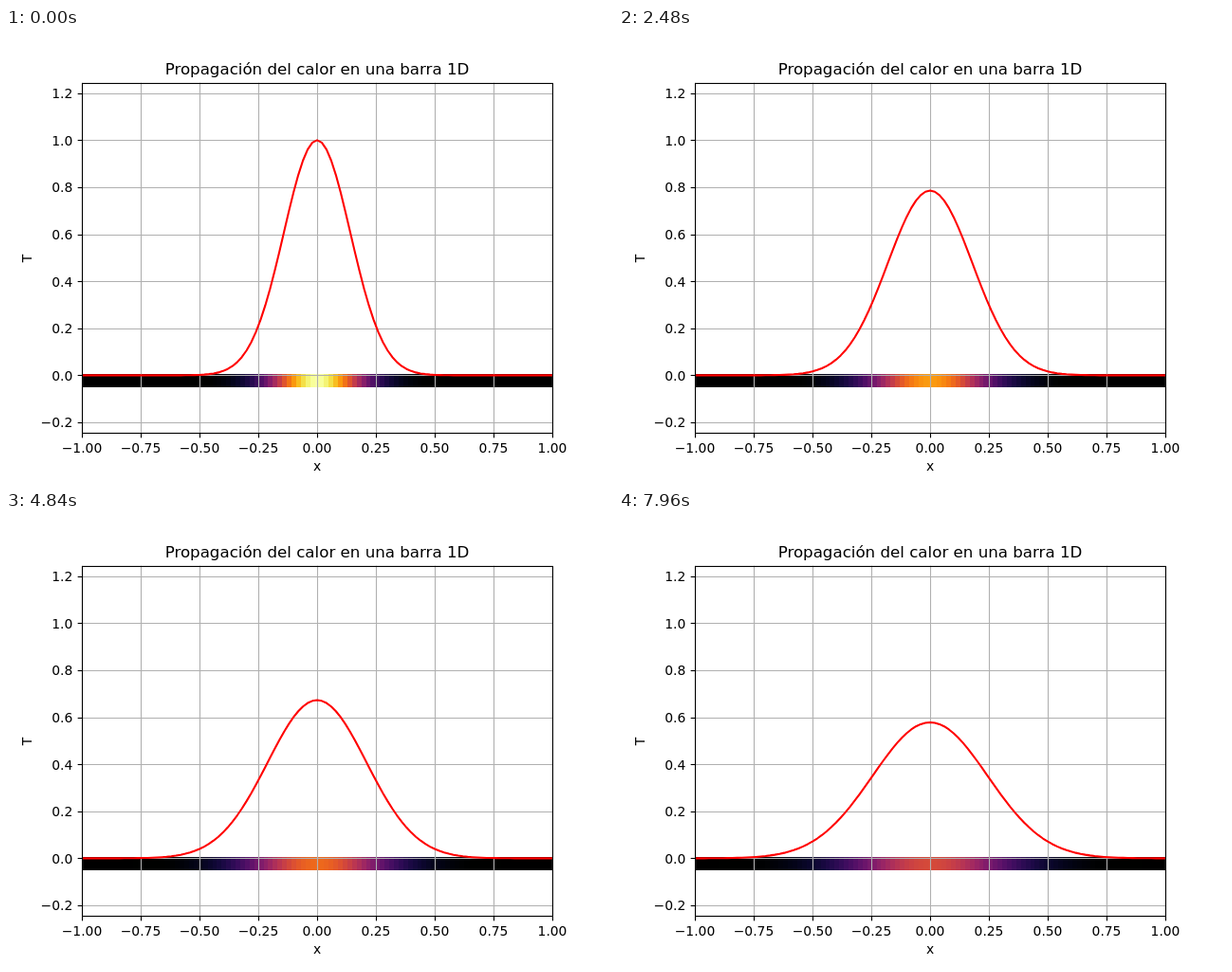
An HTML page with a canvas for the animation above (8 s loop, 640 px wide and 480 px high).

```html
<!DOCTYPE html>
<html lang="es">
<head>
<meta charset="utf-8">
<title>Propagación del calor en una barra 1D</title>
<style>
  html, body { margin: 0; width: 100%; height: 100%; overflow: hidden; background: #fff; }
  canvas { display: block; }
</style>
</head>
<body>
<canvas id="plot" width="640" height="480"></canvas>
<script>
const ctx = document.getElementById('plot').getContext('2d');
const STEP_MS = 40, STEPS = 200, POINTS = 101;
const PT = 100 / 72;
const BOX = { left: 80, right: 576, top: 57.6, bottom: 427.2 };
const SCALE = 248;
const BAR = { top: 365, bottom: 379 };

const toX = x => 328 + x * SCALE;
const toY = y => 366.4 - y * SCALE;
const snap = v => Math.floor(v + 0.5) + 0.5;
const range = (count, first, step) => Array.from({ length: count }, (_, i) => first + i * step);
const label = (v, digits) => v.toFixed(digits).replace('-', '\u2212');

const xTicks = range(9, -1, 0.25);
const yTicks = range(8, -0.2, 0.2).map(v => Math.round(v * 10) / 10);
const samples = range(POINTS, -1, 2 / (POINTS - 1));

// Polynomial fit of the inferno colour map, one row per channel.
const INFERNO = [
  [0.00021894, 0.10651342, 11.60249308, -41.70399613, 77.16293570, -71.31942824, 25.13112622],
  [0.00165100, 0.56395644, -3.97285397, 17.43639888, -33.40235894, 32.62606426, -12.24266895],
  [-0.01948090, 3.93271239, -15.94239411, 44.35414520, -81.80730926, 73.20951986, -23.07032500]
];
const inferno = v => `rgb(${INFERNO.map(row => {
  const c = row.reduceRight((sum, k) => sum * v + k, 0);
  return Math.round(255 * Math.min(1, Math.max(0, c)));
})})`;

// Heat kernel: a Gaussian that spreads while keeping its area.
function temperature(x, step) {
  const spread = 1 + 0.01 * step;
  return Math.exp(-25 * x * x / spread) / Math.sqrt(spread);
}

function line(x1, y1, x2, y2) {
  ctx.beginPath();
  ctx.moveTo(x1, y1);
  ctx.lineTo(x2, y2);
  ctx.stroke();
}

function text(str, x, y, align, points = 10) {
  ctx.font = `${points * PT}px "DejaVu Sans", sans-serif`;
  ctx.textAlign = align;
  ctx.fillText(str, x, y);
}

function drawBar(temps) {
  const edge = i => Math.round(BOX.left + i * (BOX.right - BOX.left) / POINTS);
  temps.forEach((t, i) => {
    ctx.fillStyle = inferno(t);
    ctx.fillRect(edge(i), BAR.top, edge(i + 1) - edge(i), BAR.bottom - BAR.top);
  });
}

function drawGrid() {
  ctx.strokeStyle = '#b0b0b0';
  ctx.lineWidth = 0.8 * PT;
  xTicks.forEach(v => line(snap(toX(v)), BOX.top, snap(toX(v)), BOX.bottom));
  yTicks.forEach(v => line(BOX.left, snap(toY(v)), BOX.right, snap(toY(v))));
}

function drawCurve(temps) {
  ctx.strokeStyle = '#f00';
  ctx.lineWidth = 1.5 * PT;
  ctx.lineJoin = 'round';
  ctx.beginPath();
  temps.forEach((t, i) => ctx.lineTo(toX(samples[i]), toY(t)));
  ctx.stroke();
}

function drawAxes() {
  const tick = 3.5 * PT;
  const [l, r, t, b] = [BOX.left, BOX.right, BOX.top, BOX.bottom].map(snap);
  ctx.strokeStyle = ctx.fillStyle = '#000';
  ctx.lineWidth = 0.8 * PT;
  ctx.lineJoin = 'miter';
  ctx.strokeRect(l, t, r - l, b - t);
  xTicks.forEach(v => {
    line(snap(toX(v)), b, snap(toX(v)), b + tick);
    text(label(v, 2), toX(v), 448, 'center');
  });
  yTicks.forEach(v => {
    line(l, snap(toY(v)), l - tick, snap(toY(v)));
    text(label(v, 1), 70.3, Math.round(toY(v) + 5.3), 'right');
  });
  text('Propagación del calor en una barra 1D', 328, 49, 'center', 12);
  text('x', 328, 467, 'center');
  ctx.save();
  ctx.translate(27, 242.9);
  ctx.rotate(-Math.PI / 2);
  text('T', 0, 0, 'center');
  ctx.restore();
}

function draw(step) {
  const temps = samples.map(x => temperature(x, step));
  ctx.fillStyle = '#fff';
  ctx.fillRect(0, 0, 640, 480);
  ctx.save();
  ctx.beginPath();
  ctx.rect(BOX.left, BOX.top, BOX.right - BOX.left, BOX.bottom - BOX.top);
  ctx.clip();
  drawBar(temps);
  drawGrid();
  drawCurve(temps);
  ctx.restore();
  drawAxes();
}

const start = performance.now();
function frame() {
  draw(Math.floor(Math.max(0, performance.now() - start) / STEP_MS) % STEPS);
  requestAnimationFrame(frame);
}
frame();
</script>
</body>
</html>
```
